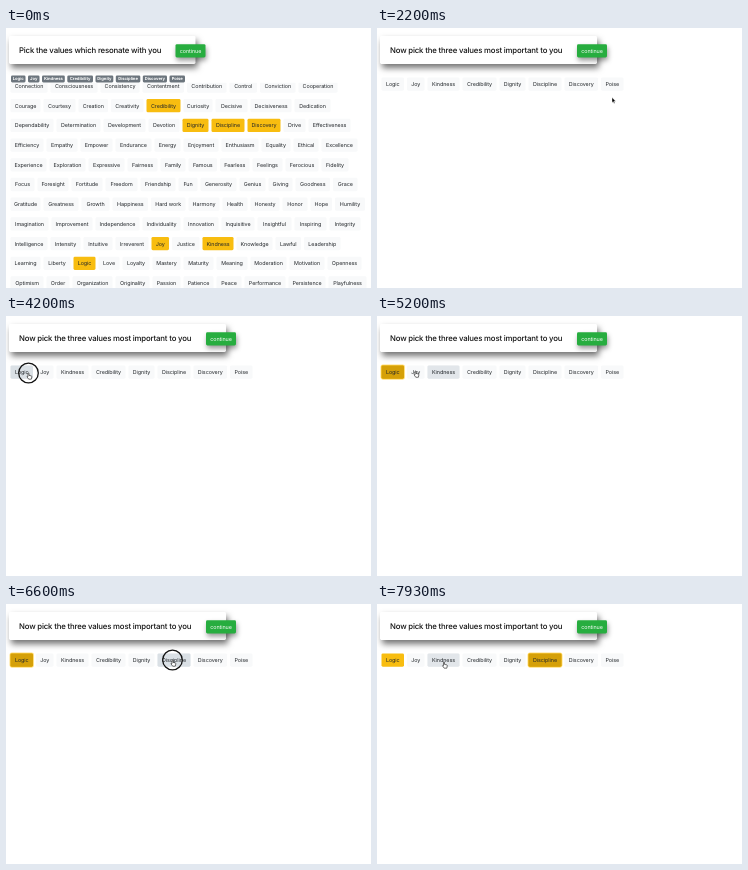
An HTML page for the animation above (8000 ms loop, 365 by 260 pixels).

```html
<!DOCTYPE html>
<html lang="en">
<head>
<meta charset="utf-8">
<title>Values picker</title>
<style>
  html, body { margin: 0; height: 100%; overflow: hidden; background: #fff; }
  svg { display: block; width: 100vw; height: 100vh; }
  text { font: 5.4px Inter, "Liberation Sans", sans-serif; letter-spacing: -.01em; fill: #212529; text-rendering: geometricPrecision; }
  .middle { text-anchor: middle; }
  .title { font-size: 7.8px; font-weight: 500; letter-spacing: -.022em; fill: #111; }
  .badge { font-size: 4.2px; font-weight: 700; fill: #fff; }
  .label { fill: #fff; }
  .card { fill: #fff; filter: drop-shadow(2px 4px 3px rgba(0, 0, 0, .55)); }
  .continue { filter: drop-shadow(1.5px 3px 2.5px rgba(0, 0, 0, .4)); }
</style>
</head>
<body>
<svg viewBox="0 0 365 260" preserveAspectRatio="none">
  <clipPath id="scrollArea"><rect y="54.7" width="365" height="206"/></clipPath>
  <g id="first"><g id="grid" clip-path="url(#scrollArea)"></g></g>
  <g id="second"></g>
  <circle id="ring" r="9.8" fill="none" stroke="#111" stroke-width="1.3"/>
  <g id="cursor" stroke-linejoin="round">
    <path id="arrow" d="M0 0V5.2L1.2 4.1 2 5.9 2.9 5.5 2.1 3.7H3.7Z" fill="#000" stroke="#fff" stroke-width=".4"/>
    <path id="hand" d="M-.5 .3Q0-.4 .5 .3V2.4L2.8 2.9Q3.4 3.1 3.3 3.8L2.8 6.2H.2L-1.5 3.8Q-1.4 3-.5 3.6Z" fill="#fff" stroke="#000" stroke-width=".55"/>
  </g>
</svg>
<script>
const LOOP = 8000, SWITCH = 1540, PICK_LOGIC = 4270, PICK_DISCIPLINE = 6740;
const LIGHT = '#f8f9fa', LIGHT_HOVER = '#e2e6ea', LIGHT_ACTIVE = '#dae0e5';
const YELLOW = '#f8bd10', YELLOW_DARK = '#d5a008', GREEN = '#27ad3f', GREEN_DARK = '#1f8936';

// Each row: left edge of every label, then the right limit.
const rows = [
  '9 Connection 49 Consciousness 99 Consistency 141 Contentment 185.5 Contribution 228 Control 258.5 Conviction 297 Cooperation 339',
  '9 Courage 42 Courtesy 77 Creation 109.5 Creativity 145 Credibility 182 Curiosity 214 Decisive 249 Decisiveness 293 Dedication 332',
  '9 Dependability 55 Determination 102 Development 147 Devotion 181 Dignity 210 Discipline 246 Discovery 282 Drive 307 Effectiveness 352',
  '9 Efficiency 45 Empathy 79 Empower 114 Endurance 153 Energy 182 Enjoyment 220 Enthusiasm 260 Equality 292 Ethical 320 Excellence 359',
  '9 Experience 48 Exploration 87 Expressive 126 Fairness 159 Family 187 Famous 218.5 Fearless 251 Feelings 284 Ferocious 320 Fidelity 350',
  '9 Focus 36 Foresight 70 Fortitude 104 Freedom 139 Friendship 177 Fun 199 Generosity 238 Genius 267 Giving 294 Goodness 331.5 Grace 359',
  '9 Gratitude 42 Greatness 80 Growth 111 Happiness 149.5 Hard_work 187 Harmony 221 Health 249 Honesty 281 Honor 309 Hope 333.5 Humility 366.5',
  '9 Imagination 50 Improvement 94 Independence 141 Individuality 182 Innovation 220 Inquisitive 256 Insightful 293 Inspiring 328 Integrity 362',
  '9 Intelligence 49 Intensity 82 Intuitive 114 Irreverent 150 Joy 170.5 Justice 201 Kindness 235 Knowledge 274 Lawful 302.5 Leadership 342',
  '9 Learning 42 Liberty 72 Logic 97 Love 121 Loyalty 151 Mastery 182 Maturity 215 Meaning 249 Moderation 288 Motivation 326 Openness 363',
  '9 Optimism 45 Order 71 Organization 114 Originality 151 Passion 182 Patience 215 Peace 243 Performance 287 Persistence 327 Playfulness 368'
];
const chosenRow = '9 Logic 34.5 Joy 55 Kindness 90 Credibility 127 Dignity 156 Discipline 192 Discovery 228.5 Poise 254';
const badgeRow = '5 Logic 22 Joy 36 Kindness 61.3 Credibility 89.5 Dignity 109.8 Discipline 136.8 Discovery 163.5 Poise 181.5';

// Cursor stops: time, x, y
const stops = [
  [0, 262, 275], [70, 262, 266], [800, 190, 24.5], [1540, 190, 24.5], [2200, 235, 69.5],
  [2330, 236, 69], [3130, 18, 56], [3200, 18, 56], [3530, 23, 59], [3730, 23, 59],
  [3870, 22.5, 57], [4270, 22.5, 57], [4870, 116, 60], [4930, 116, 60], [5300, 22, 54],
  [5730, 58, 58], [5800, 58, 58], [6330, 166.5, 56], [6740, 166.5, 56], [7200, 30, 57],
  [7400, 30, 57], [7930, 67, 58], [8000, 67, 58]
];
const clicks = [[1330, 1470], [4070, PICK_LOGIC], [6600, PICK_DISCIPLINE]];

const $ = id => document.getElementById(id);
const first = $('first'), second = $('second');

function add(parent, tag, attributes, content = '') {
  const node = document.createElementNS('http://www.w3.org/2000/svg', tag);
  for (const key in attributes) node.setAttribute(key, attributes[key]);
  node.textContent = content;
  return parent.appendChild(node);
}

function parseRow(row) {
  const parts = row.split(' ');
  const items = [];
  for (let i = 0; i + 2 < parts.length; i += 2)
    items.push({ name: parts[i + 1].replace('_', ' '), left: +parts[i], next: +parts[i + 2] });
  return items;
}

function addButton(parent, name, x, y, width, height, base, hover, textClass = '') {
  const box = { x, y, width, height, rx: 1.4 };
  const rect = add(parent, 'rect', { ...box, fill: base });
  const overlay = add(parent, 'rect', { ...box, fill: hover, opacity: 0 });
  add(parent, 'text', { x: x + width / 2, y: y + height / 2 + 1.9, class: 'middle ' + textClass }, name);
  return { name, x, y, width, height, rect, overlay };
}

function addRow(parent, row, centerY, isPicked) {
  return parseRow(row).map(({ name, left, next }) => {
    const picked = isPicked(name);
    return addButton(parent, name, left - 4.5, centerY - 6.65, next - left - 3, 13.3,
      picked ? YELLOW : LIGHT, picked ? YELLOW_DARK : LIGHT_HOVER);
  });
}

function addHeader(parent, title, width) {
  add(parent, 'rect', { x: 3, y: 8, width, height: 28, rx: 1.4, class: 'card' });
  add(parent, 'text', { x: 13, y: 25, class: 'title' }, title);
  const holder = add(parent, 'g', { class: 'continue' });
  return addButton(holder, 'continue', width - 17 + .0, 16.2, 30, 13.3, GREEN, GREEN_DARK, 'label');
}

const badges = parseRow(badgeRow);
const pickedNames = new Set(badges.map(badge => badge.name));
const gridButtons = rows.flatMap((row, i) => addRow($('grid'), row, 58 + i * 19.7, name => pickedNames.has(name)));
for (const { name, left, next } of badges) {
  const width = next - left - 2.5;
  add(first, 'rect', { x: left, y: 47.4, width, height: 7, rx: 1.3, fill: '#6c757d' });
  add(first, 'text', { x: left + width / 2, y: 52.4, class: 'middle badge' }, name);
}
const firstContinue = addHeader(first, 'Pick the values which resonate with you', 186.5);
const secondContinue = addHeader(second, 'Now pick the three values most important to you', 217);
const chosenButtons = addRow(second, chosenRow, 56.1, () => false);
const firstButtons = [...gridButtons, firstContinue];
const secondButtons = [...chosenButtons, secondContinue];

function cursorAt(time) {
  const i = Math.max(1, stops.findIndex(stop => stop[0] > time));
  const [t0, x0, y0] = stops[i - 1], [t1, x1, y1] = stops[i];
  const p = Math.max(0, (time - t0) / (t1 - t0));
  const eased = p * p * (3 - 2 * p);
  return { x: x0 + (x1 - x0) * eased, y: y0 + (y1 - y0) * eased };
}

const inside = (b, p) => p.x >= b.x && p.x <= b.x + b.width && p.y >= b.y && p.y <= b.y + b.height;

function styleChosen(button, time, pressed, position) {
  const logic = button.name === 'Logic', discipline = button.name === 'Discipline';
  const picked = logic && time >= PICK_LOGIC || discipline && time >= PICK_DISCIPLINE;
  const focused = picked && (discipline || time < PICK_DISCIPLINE);
  button.rect.setAttribute('fill', picked ? YELLOW : LIGHT);
  button.rect.setAttribute('stroke', focused ? 'rgba(255,193,7,.5)' : 'none');
  button.rect.setAttribute('stroke-width', 2);
  const active = pressed && inside(button, position);
  button.overlay.setAttribute('fill', picked ? YELLOW_DARK : active ? LIGHT_ACTIVE : LIGHT_HOVER);
  if (focused) button.overlay.setAttribute('opacity', 1);
}

function draw() {
  const time = performance.now() % LOOP;
  const onFirst = time < SWITCH;
  const position = cursorAt(time);
  const pressed = clicks.some(([from, to]) => time >= from && time < to);
  const buttons = onFirst ? firstButtons : secondButtons;

  first.style.display = onFirst ? '' : 'none';
  second.style.display = onFirst ? 'none' : '';

  // Hover colours trail the cursor by a short fade.
  const trail = [45, 57, 69, 81, 93, 105].map(lag => cursorAt(Math.max(onFirst ? 0 : SWITCH, time - lag)));
  for (const button of buttons) {
    const hover = trail.filter(point => inside(button, point)).length / trail.length;
    button.overlay.setAttribute('opacity', hover);
  }
  if (!onFirst) chosenButtons.forEach(button => styleChosen(button, time, pressed, position));

  const pointing = buttons.some(button => inside(button, position));
  $('hand').style.display = pointing ? '' : 'none';
  $('arrow').style.display = pointing ? 'none' : '';
  $('cursor').setAttribute('transform', `translate(${position.x} ${position.y})`);
  $('ring').setAttribute('transform', `translate(${position.x} ${position.y})`);
  $('ring').style.display = pressed ? '' : 'none';
  requestAnimationFrame(draw);
}
draw();
</script>
</body>
</html>
```
